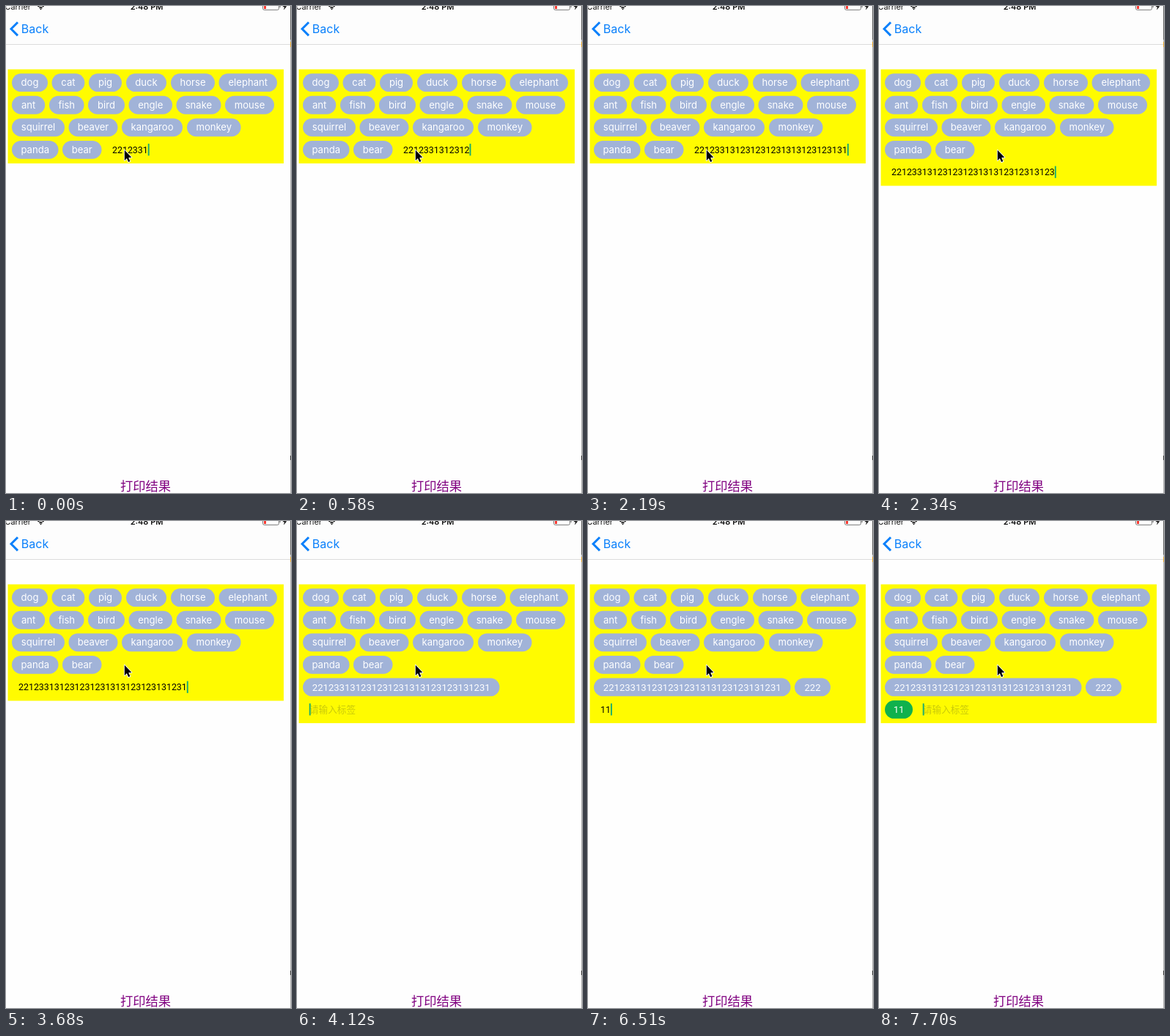
These frames come from a looping animation (389x665 px, 8000 ms). An HTML page with a canvas:

```html
<!DOCTYPE html>
<html lang="en">
<head>
<meta charset="utf-8">
<title>Tag input</title>
<style>
html, body { margin: 0; width: 100%; height: 100%; overflow: hidden; background: #fefefe; }
canvas { display: block; width: 389px; height: 665px; }
</style>
</head>
<body>
<canvas id="stage"></canvas>
<script>
const W = 389, H = 665, LOOP = 8000;
const canvas = document.getElementById('stage');
const ctx = canvas.getContext('2d');
const dpr = window.devicePixelRatio || 1;
canvas.width = W * dpr;
canvas.height = H * dpr;

const LATIN = 'Inter, Roboto, sans-serif';
const DIGITS = 'Roboto, "Liberation Sans", sans-serif';
const CJK = '"Noto Sans CJK SC", "Noto Sans CJK", sans-serif';
const CHIP = '#a1b3d8', GREEN = '#10b14d', BLUE = '#0a80fb', YELLOW = '#fffb00';
const LONG = '221233131231231231313123123131231';

// Each chip: label, left, right
const rows = [
  [['dog', 8, 57], ['cat', 62.5, 107.4], ['pig', 113, 158], ['duck', 164, 219], ['horse', 225, 285], ['elephant', 290.5, 370]],
  [['ant', 8, 53.2], ['fish', 59, 106.5], ['bird', 112, 162], ['engle', 167.5, 227], ['snake', 232.5, 293.4], ['mouse', 299, 366]],
  [['squirrel', 8, 80], ['beaver', 85.5, 152.5], ['kangaroo', 158, 241], ['monkey', 247, 320.5]],
  [['panda', 8, 71.5], ['bear', 77, 130.5]]
];
const addedChips = [[LONG, 8, 276.5, 4], ['222', 282, 331, 4], ['11', 8, 46, 5]];

// Time, typed text, number of added chips, last chip selected
const edits = [
  [4120, '', 1], [5020, '2', 1], [5170, '22', 1], [5320, '222', 1],
  [5470, '', 2], [6060, '1', 2], [6510, '11', 2], [6800, '', 3], [7700, '', 3, true]
];

const rowCenter = row => 104.7 + row * 30.55;

function stateAt(t) {
  const edit = edits.filter(e => e[0] <= t).pop();
  if (edit) {
    const [since, text, added, selected] = edit;
    return { since, text, added, selected, row: 5, x: added === 3 ? 60 : 17 };
  }
  const step = t < 140 ? 0 : 1 + Math.floor((t - 140) / 145.5);
  const count = t >= 2490 ? 33 : step < 9
    ? Math.floor(7 + step * 1.625)
    : Math.min(32, 21 + Math.floor((step - 9) * 11 / 7));
  const wrapped = count > 31;
  return {
    since: Math.min(t, 2490), text: LONG.slice(0, count), added: 0,
    row: wrapped ? 4 : 3, x: wrapped ? 17 : 145
  };
}

function caretAlpha(idle) {
  if (idle < 600 || idle >= 1190) return 1;
  return idle >= 740 && idle < 1040 ? 0 : 0.5;
}

function label(text, x, y, size, color, { align = 'left', weight = 400, family = LATIN } = {}) {
  ctx.font = `${weight} ${size}px ${family}`;
  ctx.textAlign = align;
  ctx.fillStyle = color;
  ctx.fillText(text, x, y);
}

function rect(x, y, w, h, color) {
  ctx.fillStyle = color;
  ctx.fillRect(x, y, w, h);
}

function polygon(points, color) {
  ctx.beginPath();
  points.forEach(([x, y]) => ctx.lineTo(x, y));
  ctx.closePath();
  ctx.fillStyle = color;
  ctx.fill();
}

function chip([text, left, right], row, color = CHIP) {
  const y = rowCenter(row);
  ctx.beginPath();
  ctx.roundRect(left, y - 12.4, right - left, 24.8, 12.4);
  ctx.fillStyle = color;
  ctx.fill();
  const family = /\d/.test(text) ? DIGITS : LATIN;
  label(text, (left + right) / 2, y + 4.6, 13.1, '#fff', { align: 'center', family });
}

function drawChrome() {
  rect(0, 0, W, H, '#fefefe');
  rect(0, 0, 388, 52, '#fdfdfd');
  rect(0, 52, 388, 1, '#dcdcdc');

  label('Carrier', -1.5, 5, 10.8, '#111');
  label('2:48 PM', 192, 5, 11, '#111', { align: 'center', weight: 600 });

  ctx.strokeStyle = '#111';
  ctx.lineWidth = 1.6;
  for (const r of [2.6, 5.2]) {
    ctx.beginPath();
    ctx.arc(47.5, 4.5, r, -Math.PI * 0.77, -Math.PI * 0.23);
    ctx.stroke();
  }
  polygon([[45.9, 3.4], [49.1, 3.4], [47.5, 5.4]], '#111');

  ctx.strokeStyle = '#777';
  ctx.lineWidth = 1;
  ctx.beginPath();
  ctx.roundRect(350.5, -5, 22, 10.3, 2);
  ctx.stroke();
  rect(352, -3, 3, 7, '#fa3a32');
  rect(373.5, -1, 1.2, 3, '#777');
  polygon([[381, -3], [377.5, 1.3], [380, 1.3], [379, 5.5], [383.3, 0.3], [380.8, 0.3]], '#111');

  ctx.strokeStyle = BLUE;
  ctx.lineWidth = 3;
  ctx.beginPath();
  ctx.moveTo(16, 22.2);
  ctx.lineTo(7, 31.3);
  ctx.lineTo(16, 40.4);
  ctx.stroke();
  label('Back', 20.8, 37.2, 16, BLUE);

  label('打印结果', 190.5, 661.8, 17.3, '#800080', { align: 'center', weight: 300, family: CJK });

  rect(388, 0, 1, H, '#b4b4b4');
  rect(388, 0, 1, 46, '#666');
  rect(388, 49, 1, 7, '#e5a52c');
  rect(388, 614, 1, 6, '#333');
}

function drawInput(s, t) {
  const y = rowCenter(s.row);
  if (s.text) label(s.text, s.x, y + 4.4, 12.4, '#000', { family: DIGITS });
  else label('请输入标签', s.x, y + 4.7, 12.6, '#c9c90a', { family: CJK });
  const caretX = s.x + (s.text ? ctx.measureText(s.text).width : -0.3);
  ctx.globalAlpha = caretAlpha(t - s.since);
  rect(caretX, y - 8.3, 1.9, 16.3, '#14ac72');
  ctx.globalAlpha = 1;
}

function drawPointer() {
  const arrow = [[161.8, 196.8], [161.8, 210.9], [164.9, 208], [167.1, 213.1],
    [169.4, 212.1], [167.2, 207.1], [171.4, 206.8]];
  ctx.lineJoin = 'round';
  polygon(arrow, '#000');
  ctx.strokeStyle = '#fff';
  ctx.lineWidth = 1.8;
  ctx.stroke();
  ctx.fill();
  ctx.lineJoin = 'miter';
}

function draw(now) {
  const t = now % LOOP;
  const s = stateAt(t);
  ctx.setTransform(dpr, 0, 0, dpr, 0, 0);
  drawChrome();
  rect(2.5, 86.5, 376.5, rowCenter(s.row) + 18.6 - 86.5, YELLOW);
  rows.forEach((row, i) => row.forEach(item => chip(item, i)));
  addedChips.slice(0, s.added).forEach((item, i) =>
    chip(item, item[3], s.selected && i === s.added - 1 ? GREEN : CHIP));
  drawInput(s, t);
  drawPointer();
  requestAnimationFrame(draw);
}
requestAnimationFrame(draw);
</script>
</body>
</html>
```
